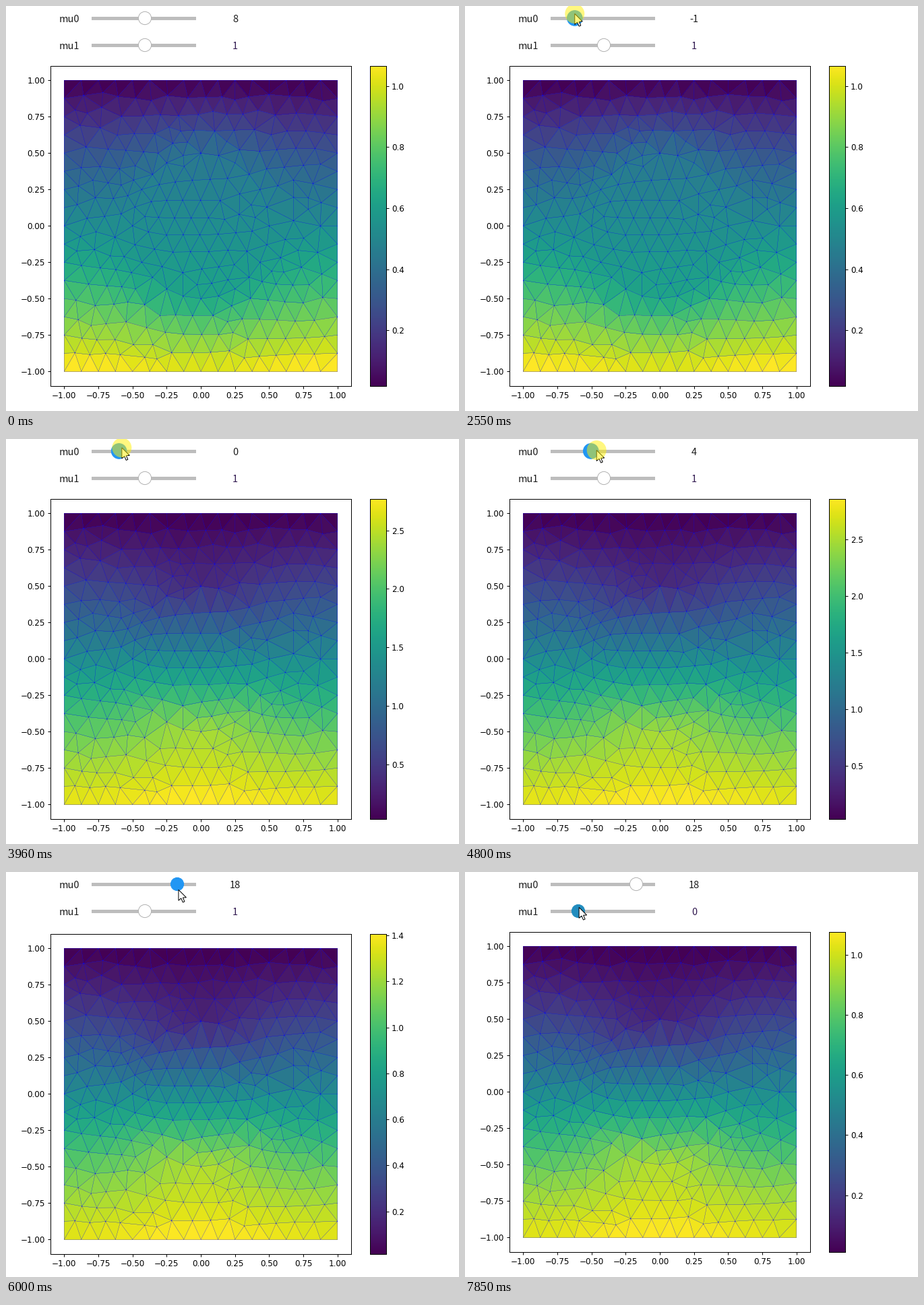
A matplotlib script for the animation above (8000 ms loop, 672 by 601 pixels).

```python
import numpy as np
import matplotlib.pyplot as plt
from matplotlib.animation import FuncAnimation
from matplotlib.patches import Circle, Polygon, Rectangle
from matplotlib.tri import Triangulation

W, H, DPI = 672, 601, 100
PX = 72 / DPI
STEP, FRAMES = 50, 160

plt.rcParams.update({
    "font.family": "DejaVu Sans", "font.size": 12 * PX, "axes.linewidth": PX,
    **{f"{a}tick.major.{key}": size * PX for a in "xy"
       for key, size in (("size", 4.2), ("pad", 4.2), ("width", 1))},
})


# --- mesh of the square with a disc of radius 0.5 ---

def triangulate(points):
    tri = Triangulation(*points.T)
    a, b, c = (points[tri.triangles[:, i]] for i in range(3))
    area = np.abs((b - a)[:, 0] * (c - a)[:, 1] - (b - a)[:, 1] * (c - a)[:, 0]) / 2
    return Triangulation(*points.T, tri.triangles[area > 1e-6])


def build_mesh():
    rng = np.random.default_rng(7)
    s = np.linspace(-1, 1, 17)
    one = np.ones(17)
    border = np.vstack([np.c_[s, -one], np.c_[s, one],
                        np.c_[-one, s][1:-1], np.c_[one, s][1:-1]])
    angle = np.arange(24) * np.pi / 12
    ring = 0.5 * np.c_[np.cos(angle), np.sin(angle)]
    inner = np.array([(x, y) for row, y in enumerate(np.linspace(-0.885, 0.885, 16))
                      for x in np.arange(-0.9375 + 0.0625 * (row % 2), 0.93, 0.125)])
    inner += rng.uniform(-0.045, 0.045, inner.shape)
    radius = np.hypot(*inner.T)
    inner = inner[(np.abs(radius - 0.5) > 0.068) & (np.abs(inner).max(axis=1) < 0.935)]
    points = np.vstack([border, ring, inner])
    fixed = len(border) + len(ring)
    for _ in range(2):
        total, count = np.zeros_like(points), np.zeros(len(points))
        edges = triangulate(points).edges
        for i, j in (edges.T, edges.T[::-1]):
            np.add.at(total, i, points[j])
            np.add.at(count, i, 1)
        mean = total / np.maximum(count, 1)[:, None]
        points[fixed:] += 0.6 * (mean - points)[fixed:]
    return triangulate(points)


def solve_heat(mesh, k_disc):
    """Facet temperatures: zero on top, constant flux through the bottom."""
    p, t = np.c_[mesh.x, mesh.y], mesh.triangles
    v = p[t]
    opposite = v[:, [2, 0, 1]] - v[:, [1, 2, 0]]
    area = np.abs(opposite[:, 0, 0] * opposite[:, 1, 1]
                  - opposite[:, 0, 1] * opposite[:, 1, 0]) / 2
    k = np.where(np.hypot(*v.mean(axis=1).T) < 0.49, k_disc, 1.0)
    local = np.einsum("nid,njd->nij", opposite, opposite) * (k / (4 * area))[:, None, None]
    stiff = np.zeros((len(p), len(p)))
    np.add.at(stiff, (t[:, :, None], t[:, None, :]), local)
    load = np.where(p[:, 1] < -1 + 1e-9, 1.0, 0.0)
    load[np.abs(p[:, 0]) > 1 - 1e-9] /= 2
    free = p[:, 1] < 1 - 1e-9
    u = np.zeros(len(p))
    u[free] = np.linalg.solve(stiff[np.ix_(free, free)], load[free])
    return u[t].mean(axis=1)


class HeatMap:
    def __init__(self, start, peak, conducting=False):
        self.start = start
        heat = solve_heat(mesh, 5 if conducting else 0.07 * peak)
        self.field = (heat - heat.min()) / np.ptp(heat)
        low = peak * heat.min() / heat.max()
        ticks = np.arange(*((0.5, peak, 0.5) if peak > 2 else (0.2, peak, 0.2)))
        self.labels = [f"{v:.1f}" for v in ticks]
        self.ticks = (ticks - low) / (peak - low)
        # a label at the very top of the bar pushes the plot down
        self.shift = 3 if self.ticks[-1] > 0.99 else 0


mesh = build_mesh()
maps = [HeatMap(0, 1.066, True), HeatMap(2950, 2.77), HeatMap(4190, 2.858),
        HeatMap(5060, 1.354, True), HeatMap(6000, 1.407), HeatMap(7700, 1.077)]


# --- figure ---

def box(left, right, shift=0):
    top, bottom = 88.7 + shift, 563.8 + shift
    return [left / W, 1 - bottom / H, (right - left) / W, (bottom - top) / H]


PLOT, BAR = (66.1, 512.1), (540, 563.6)
fig = plt.figure(figsize=(W / DPI, H / DPI), dpi=DPI, facecolor="white")
ax = fig.add_axes(box(*PLOT))
bar = fig.add_axes(box(*BAR))
ui = fig.add_axes([0, 0, 1, 1], zorder=5)
ui.set(xlim=(0, W), ylim=(H, 0))
ui.axis("off")

facets = ax.tripcolor(mesh, maps[0].field, cmap="viridis", vmin=0, vmax=1)
ax.triplot(mesh, color="b", lw=0.27 * PX)
ax.set(xlim=(-1.1, 1.1), ylim=(-1.1, 1.1),
       xticks=np.linspace(-1, 1, 9), yticks=np.linspace(-1, 1, 9))
for axis in (ax.xaxis, ax.yaxis):
    axis.set_major_formatter("{x:.2f}")

bar.imshow(np.linspace(0, 1, 256)[:, None], cmap="viridis", origin="lower",
           aspect="auto", extent=(0, 1, 0, 1))
bar.set_xticks([])
bar.yaxis.tick_right()


# --- sliders and pointer ---

class Slider:
    CENTER = 206

    def __init__(self, name, y, middle, unit, drag, color, hot):
        self.y, self.middle, self.unit = y, middle, unit
        self.drag, self.hot = drag, hot
        self.label(78.5, name, color="#1c1c1c")
        ui.add_patch(Rectangle((127, y - 2), 155, 5, color="#bdbdbd", lw=0))
        self.knob = ui.add_patch(Circle((self.CENTER, y), lw=PX, zorder=3))
        self.value = self.label(340, "", ha="center", color=color)

    def label(self, x, text, **style):
        return ui.text(x, self.y + 6.5, text, family="Noto Sans CJK JP",
                       size=14.5 * PX, **style)

    def x_of(self, value):
        return self.CENTER + self.unit * (value - self.middle)

    def grip(self, value):
        """Where the hand holds the knob: it sinks a little towards the right."""
        x = self.x_of(value)
        return np.array([x, self.y - 7 + 0.16 * (x - 160)])

    def update(self, t, tip, pressed):
        # the knob snaps to whole values and trails the pointer slightly
        x = pointer(np.clip(t - 40, *self.drag))[0]
        value = int(np.floor(self.middle + (x - self.CENTER) / self.unit + 1e-6))
        center = (self.x_of(value), self.y)
        held = pressed and self.drag[0] <= t < self.drag[1]
        hot = held or (t > MOVES[0][0] and np.hypot(*(tip - center)) < 11)
        self.knob.set(center=center, radius=11.3 if held else 9.6,
                      facecolor=self.hot if hot else "white",
                      edgecolor=self.hot if hot else "#b3b3b3")
        self.value.set_text(str(value))


mu0 = Slider("mu0", 18, 8, 4.8, (1820, 5740), "#1c1c1c", "#2196f3")
mu1 = Slider("mu1", 58, 1, 38, (7150, 7610), "#30184f", "#218cbe")

ENTRY = np.array([508, 554])
MOVES = [(340, 730, np.array([355, 110])), (960, 1540, mu0.grip(8)),
         (2070, 2700, mu0.grip(-1.8)), (3640, 4040, mu0.grip(1)),
         (4510, 5470, mu0.grip(18.4)), (6780, 7080, mu1.grip(1)),
         (7250, 7550, mu1.grip(0.03))]
PRESSES = [(1820, 2790), (3400, 5740), mu1.drag]


def pointer(t):
    tip = ENTRY
    for start, end, goal in MOVES:
        s = np.clip((t - start) / (end - start), 0, 1)
        tip = tip + (goal - tip) * s * s * (3 - 2 * s)
    return tip


ARROW = np.array([(0, 0), (0, 16), (3.8, 12.6), (6.4, 18.6), (9, 17.5),
                  (6.5, 11.7), (11.5, 11.5)])
arrow = ui.add_patch(Polygon(ARROW, fc="white", ec="black", lw=PX, zorder=6))
glow = ui.add_patch(Circle((0, 0), 14.5, fc="#fff000", alpha=0.5, lw=0, zorder=7))


def show_map(t):
    heat = [m for m in maps if m.start <= t][-1]
    facets.set_array(heat.field)
    bar.set_yticks(heat.ticks, heat.labels)
    ax.set_position(box(*PLOT, heat.shift))
    bar.set_position(box(*BAR, heat.shift))


def update(frame):
    t = frame * STEP + 40
    show_map(t)
    tip = pointer(t)
    pressed = any(start <= t < end for start, end in PRESSES)
    for slider in (mu0, mu1):
        slider.update(t, tip, pressed)
    arrow.set_xy(ARROW + tip)
    arrow.set_visible(t >= MOVES[0][0])
    glow.center = tuple(tip)
    glow.set_visible(pressed)
    return []


anim = FuncAnimation(fig, update, frames=FRAMES, interval=STEP, repeat=True,
                     repeat_delay=0, blit=False, cache_frame_data=False)
plt.show()
```
